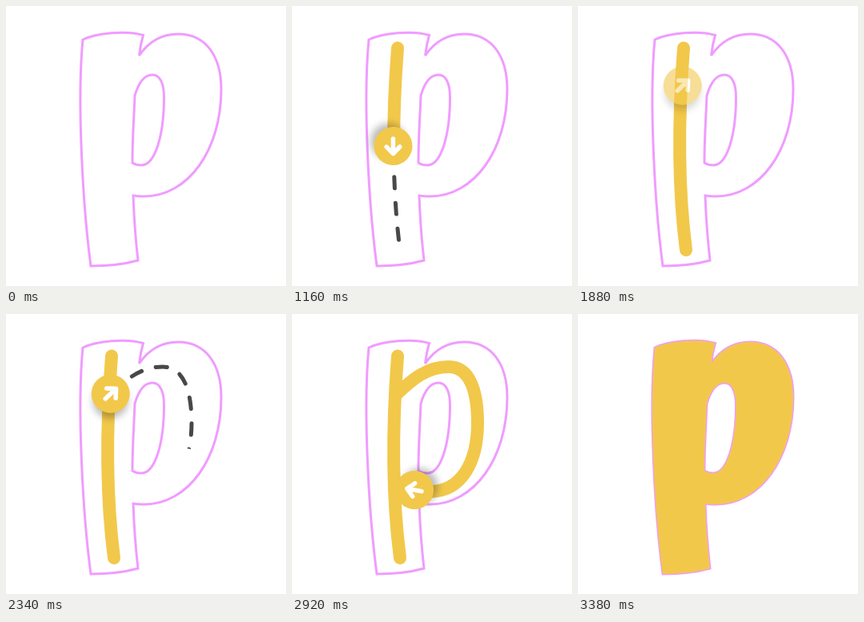
Recreate the animation shown at these times as an HTML page. Size 350 px wide and 350 px high, loop 4.8 s.

```html
<!DOCTYPE html>
<html lang="en">
<head>
<meta charset="utf-8">
<title>Letter tracing</title>
<style>
  html, body { margin: 0; width: 100%; height: 100%; overflow: hidden; background: #fff; }
  svg { display: block; width: 100vw; height: 100vh; }
  .line { fill: none; stroke-linecap: round; stroke-linejoin: round; }
  .dash { stroke: #484848; stroke-width: 5; stroke-dasharray: 14 18.3; }
  .ink { stroke: #f2c84b; stroke-width: 16; }
  .mask { fill: none; stroke: #fff; stroke-width: 14; }
</style>
</head>
<body>
<svg viewBox="0 0 350 350">
  <defs>
    <path id="letter" fill-rule="evenodd" d="M96 42C113 34 150 30 171.5 36.5C169 45 167.5 53 166.5 62
      C178 45 195 35 215 35C250 35 269 63 269 104C269 180 228 238 172 238C166 238 162 237.5 159 237
      C160 265 162 292 165 318C147 323 125 325 106 325C96 250 88.5 118 96 42Z
      M161 112C166 95 174 86 183 86C192 86 197.5 96 197.5 114C197.5 160 187 199 169 199
      C165 199 161 198 158 196C158 165 160 138 161 112Z"/>
    <filter id="blur" x="-50%" y="-50%" width="200%" height="200%"><feGaussianBlur stdDeviation="5"/></filter>
  </defs>
  <use href="#letter" fill="#fff" stroke="#f09cff" stroke-width="3"/>
  <g id="strokes"></g>
  <g id="disc">
    <circle cx="-6" cy="6" r="22" fill="#000" opacity=".27" filter="url(#blur)"/>
    <circle r="24" fill="#f2c84b"/>
    <path class="line" stroke="#fff" stroke-width="5.5" d="M-9 0H9M1 -8.3L9.5 0L1 8.3"/>
  </g>
  <use id="fill" href="#letter" fill="#f2c84b" opacity="0"/>
</svg>
<script>
const LOOP = 4800;
const NS = 'http://www.w3.org/2000/svg';
const disc = document.getElementById('disc');
const fill = document.getElementById('fill');
const layer = document.getElementById('strokes');

const linear = u => u;
const sine = u => (1 - Math.cos(Math.PI * u)) / 2;
const ramp = (t, [from, to]) => Math.min(1, Math.max(0, (t - from) / (to - from)));

// Times in ms: disc fades in, dashes appear, disc moves, disc fades out.
const strokes = [
  { d: 'M132 52.5C126 130 124 220 135 305', shift: [-0.7, -4.5], dashShift: 0, ease: linear,
    show: [20, 220], dashes: [670, 930], move: [978, 1342], hide: [1480, 1620] },
  { d: 'M131 100C150 82 168 66 196 66C222 66 232 96 232 136C232 185 212 222 172 222C158 222 144 219 131 214',
    shift: [-0.3, -0.3], dashShift: -2, ease: sine,
    show: [1800, 1940], dashes: [2140, 2472], move: [2530, 3003], hide: [3220, 3380] }
];

function add(parent, tag, attrs) {
  const el = document.createElementNS(NS, tag);
  for (const key in attrs) el.setAttribute(key, attrs[key]);
  return parent.appendChild(el);
}

strokes.forEach((s, i) => {
  const mask = add(layer, 'mask', { id: 'reveal' + i, maskUnits: 'userSpaceOnUse', width: 350, height: 350 });
  s.mask = add(mask, 'path', { d: s.d, class: 'mask' });
  s.dash = add(layer, 'path', {
    d: s.d, class: 'line dash', 'stroke-dashoffset': s.dashShift, mask: `url(#reveal${i})`
  });
  s.ink = add(layer, 'path', { d: s.d, class: 'line ink' });
  s.length = s.ink.getTotalLength();
});

function reveal(path, drawn, length) {
  path.setAttribute('visibility', drawn > 0 ? 'visible' : 'hidden');
  path.setAttribute('stroke-dasharray', `${drawn} ${length + 50}`);
}

function placeDisc(s, at, opacity) {
  const p = s.ink.getPointAtLength(at);
  const a = s.ink.getPointAtLength(Math.max(0, at - 1));
  const b = s.ink.getPointAtLength(Math.min(s.length, at + 1));
  const angle = Math.atan2(b.y - a.y, b.x - a.x) * 180 / Math.PI;
  const [dx, dy] = s.shift;
  disc.setAttribute('transform', `translate(${p.x + dx} ${p.y + dy}) rotate(${angle})`);
  disc.setAttribute('opacity', opacity);
}

function render(t) {
  disc.setAttribute('opacity', 0);
  for (const s of strokes) {
    const at = s.length * s.ease(ramp(t, s.move));
    reveal(s.mask, s.length * ramp(t, s.dashes), s.length);
    reveal(s.ink, at, s.length);
    s.dash.setAttribute('visibility', t < s.move[1] ? 'visible' : 'hidden');
    if (t > s.show[0] && t < s.hide[1]) {
      placeDisc(s, at, ramp(t, s.show) * (1 - ramp(t, s.hide)));
    }
  }
  fill.setAttribute('opacity', ramp(t, [3220, 3380]));
}

const start = performance.now();
function tick() {
  render((performance.now() - start) % LOOP);
  requestAnimationFrame(tick);
}
tick();
</script>
</body>
</html>
```
